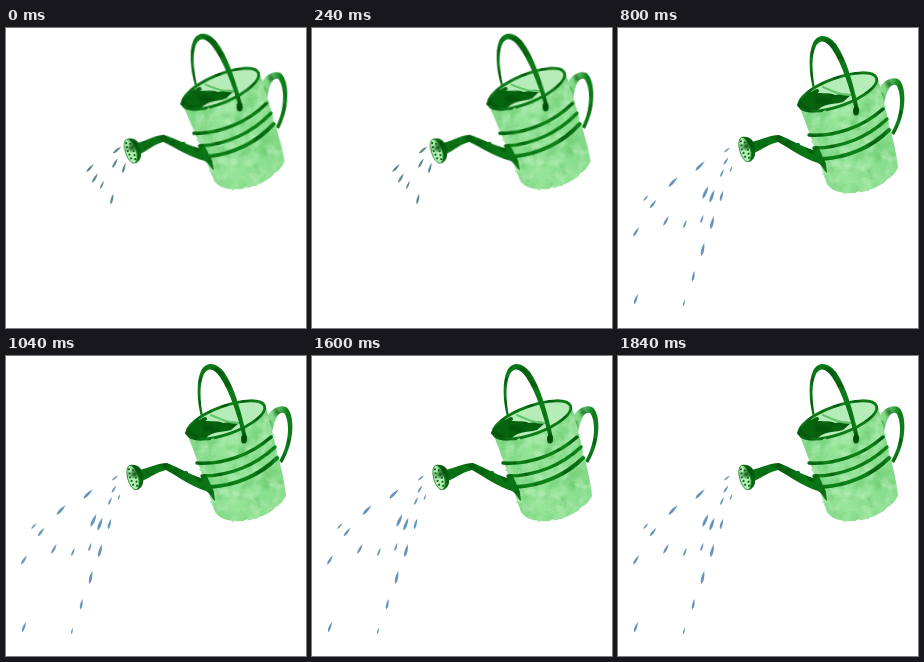
Write an HTML page that moves like this. It is 300 px wide and 300 px high and loops after 2 s.

```html
<!DOCTYPE html>
<html lang="en">
<head>
<meta charset="utf-8">
<title>Watering can</title>
<style>
  html, body { margin: 0; width: 100%; height: 100%; overflow: hidden; background: #fff; }
  svg { display: block; width: 100%; height: 100%; }
</style>
</head>
<body>
<svg viewBox="0 0 300 300">
  <defs>
    <!-- soft paint pools inside the shape, with a slightly uneven edge -->
    <filter id="wash" x="-5%" y="-5%" width="110%" height="110%" color-interpolation-filters="sRGB">
      <feTurbulence type="fractalNoise" baseFrequency=".09" numOctaves="4" seed="8" result="noise"/>
      <feDisplacementMap in="SourceGraphic" in2="noise" scale="2.5" xChannelSelector="R" yChannelSelector="G" result="shape"/>
      <feColorMatrix in="noise" values="0 0 0 0 .74  0 0 0 0 .94  0 0 0 0 .74  1.8 0 0 0 -.8" result="light"/>
      <feColorMatrix in="noise" values="0 0 0 0 .38  0 0 0 0 .77  0 0 0 0 .4  0 1.6 0 0 -.72" result="deep"/>
      <feMerge result="blots"><feMergeNode in="deep"/><feMergeNode in="light"/></feMerge>
      <feComposite in="blots" in2="shape" operator="atop"/>
    </filter>
    <filter id="ink" x="-10%" y="-10%" width="120%" height="120%" color-interpolation-filters="sRGB">
      <feTurbulence type="fractalNoise" baseFrequency=".09" numOctaves="2" seed="3" result="noise"/>
      <feDisplacementMap in="SourceGraphic" in2="noise" scale="1.4" xChannelSelector="R" yChannelSelector="G" result="shape"/>
      <feColorMatrix in="noise" values="0 0 0 0 0  0 0 0 0 .3  0 0 0 0 .03  2.2 0 0 0 -1" result="pool"/>
      <feComposite in="pool" in2="shape" operator="atop"/>
    </filter>
    <linearGradient id="grip" x1="0" y1=".2" x2="1" y2=".4">
      <stop offset=".25" stop-color="#82dd88"/>
      <stop offset=".75" stop-color="#0d7f19"/>
    </linearGradient>
    <linearGradient id="side" x1="0" y1=".4" x2="1" y2=".2">
      <stop offset="0" stop-color="#7cd681"/>
      <stop offset=".35" stop-color="#96e599"/>
      <stop offset="1" stop-color="#82da87"/>
    </linearGradient>
    <clipPath id="mouth"><ellipse cx="220" cy="64" rx="40" ry="13.5" transform="rotate(-20 220 64)"/></clipPath>
  </defs>
  <g id="water"></g>
  <g id="can" fill="none" stroke-linecap="round" stroke-linejoin="round">
    <path filter="url(#ink)" fill="url(#grip)" d="M260 63C264 53 273 48 280 51C290 58 288 88 276 107L273 105C284 87 284 64 278 57C272 55 268 64 266 77Z"/>
    <path filter="url(#wash)" fill="url(#side)" d="M182 80C187 93 194 112 199 126L209 156C214 164 226 166 238 165C255 163 273 153 280 140C279 125 273 104 269 87L260 51Z"/>
    <g filter="url(#ink)" stroke="#0d8119">
      <path d="M191 107C218 109 246 98 265 81" stroke-width="3.4"/>
      <path d="M196 120C224 120 250 109 269 91" stroke-width="3.4"/>
      <path d="M203 131C229 130 254 119 271 102" stroke-width="4"/>
    </g>
    <g clip-path="url(#mouth)">
      <rect x="175" y="40" width="90" height="45" fill="#b5ecb7"/>
      <path filter="url(#ink)" fill="#07640f" d="M176 80L190 64C202 66 211 64 217 67C224 66 230 65 233 67L225 74C213 77 207 75 200 82L184 88Z"/>
      <path d="M205 59C214 63 221 67 233 67" stroke="#62c56b" stroke-width="2"/>
    </g>
    <g filter="url(#ink)">
      <ellipse cx="220" cy="64" rx="41" ry="14" transform="rotate(-20 220 64)" stroke="#0c7a17" stroke-width="2.8"/>
      <path d="M181 77C184 71 191 67 199 63" stroke="#07640f" stroke-width="4"/>
      <path fill="#0d7a18" d="M195 61C191 45 190 26 195 15C200 5 210 6 218 16C229 32 235 55 241 82H237C232 60 224 36 214 21C208 12 202 11 198 18C193 28 194 45 197 60Z"/>
      <ellipse cx="238" cy="83" rx="3" ry="4.5" fill="#07560d"/>
      <path fill="#0a7515" d="M134 114C145 111 152 107 161 107C172 111 182 118 195 122C196 120 198 118 200 118C203 125 205 129 208 136L209 145C206 143 205 138 200 135C184 130 173 121 160 114C151 116 145 121 136 125Z"/>
      <path fill="#08650f" d="M124 109C132 108 136 112 137 120C138 128 136 132 131 134Z"/>
      <ellipse cx="127" cy="121.5" rx="5.4" ry="12.6" transform="rotate(-15 127 121.5)" fill="#b4eeb7" stroke="#1b8a27" stroke-width=".8"/>
    </g>
    <g id="holes" fill="#0b6c14" transform="rotate(-15 127 121.5)"></g>
  </g>
</svg>
<script>
  const $ = id => document.getElementById(id);
  const HOLD = 400;

  // A jet is a row of evenly spaced drops: x and y of both ends, then the count.
  const start = { turn: -3, color: '#5f8990', origin: 135, jets: [
    [111, 122, 84, 140, 2], [109, 135, 89, 150, 2], [118, 140, 106, 171, 2], [96, 157, 96, 157, 1]] };
  const pause = { turn: -10, color: '#8b9498', origin: 121, jets: [[122, 298, 122, 298, 1]] };
  const spray = { turn: 0, color: '#6593bf', origin: 135, jets: [
    [109, 122, 28, 170, 4], [113, 141, 66, 275, 6], [104, 145, 84, 191, 3],
    [108, 133, 67, 196, 3], [35, 176, 18, 204, 2], [48, 193, 18, 271, 2]] };
  const fall = { turn: -13.2, color: '#6c9fc9', origin: 119, jets: [
    [99, 133, 77, 154, 2], [101, 147, 88, 167, 2], [110, 152, 103, 183, 2],
    [112, 179, 118, 293, 5], [86, 262, 104, 274, 2]] };
  const poses = [start, pause, spray, fall, spray];

  // Each drop points along a parabola that leaves the rose level.
  function drop(x, y, len, origin) {
    const angle = Math.atan2(2 * (y - 112), origin - x) * 180 / Math.PI;
    const h = len / 2, w = len * .22;
    return `<path transform="translate(${x} ${y}) rotate(${-angle})" d="M${-h} 0Q${-h * .4} ${-w} ${h} 0Q${-h * .4} ${w} ${-h} 0Z"/>`;
  }

  // Drops are longest in the middle of their jet.
  function jet([x0, y0, x1, y1, count], origin) {
    let out = '';
    for (let i = 0; i < count; i++) {
      const u = count > 1 ? i / (count - 1) : 0;
      const len = 4 + 10 * Math.sin(Math.PI * (i + .5) / count) * (count > 1 ? 1 : .5);
      out += drop(x0 + (x1 - x0) * u, y0 + (y1 - y0) * u, len, origin);
    }
    return out;
  }

  let holes = '';
  for (let row = -2; row <= 2; row++)
    for (const side of [-1, 1])
      holes += `<circle cx="${127 + side * (2.8 - Math.abs(row) * .5)}" cy="${121.5 + row * 4 + side}" r="1.1"/>`;
  $('holes').innerHTML = holes;

  let shown = -1;
  function render(time) {
    const step = Math.floor(time / HOLD) % poses.length;
    if (step === shown) return;
    shown = step;
    const { turn, color, origin, jets } = poses[step];
    $('can').setAttribute('transform', `rotate(${turn} 156.5 165.5)`);
    $('water').setAttribute('fill', color);
    $('water').innerHTML = jets.map(j => jet(j, origin)).join('');
  }

  const begin = performance.now();
  function tick() {
    render(performance.now() - begin);
    requestAnimationFrame(tick);
  }
  tick();
</script>
</body>
</html>
```
